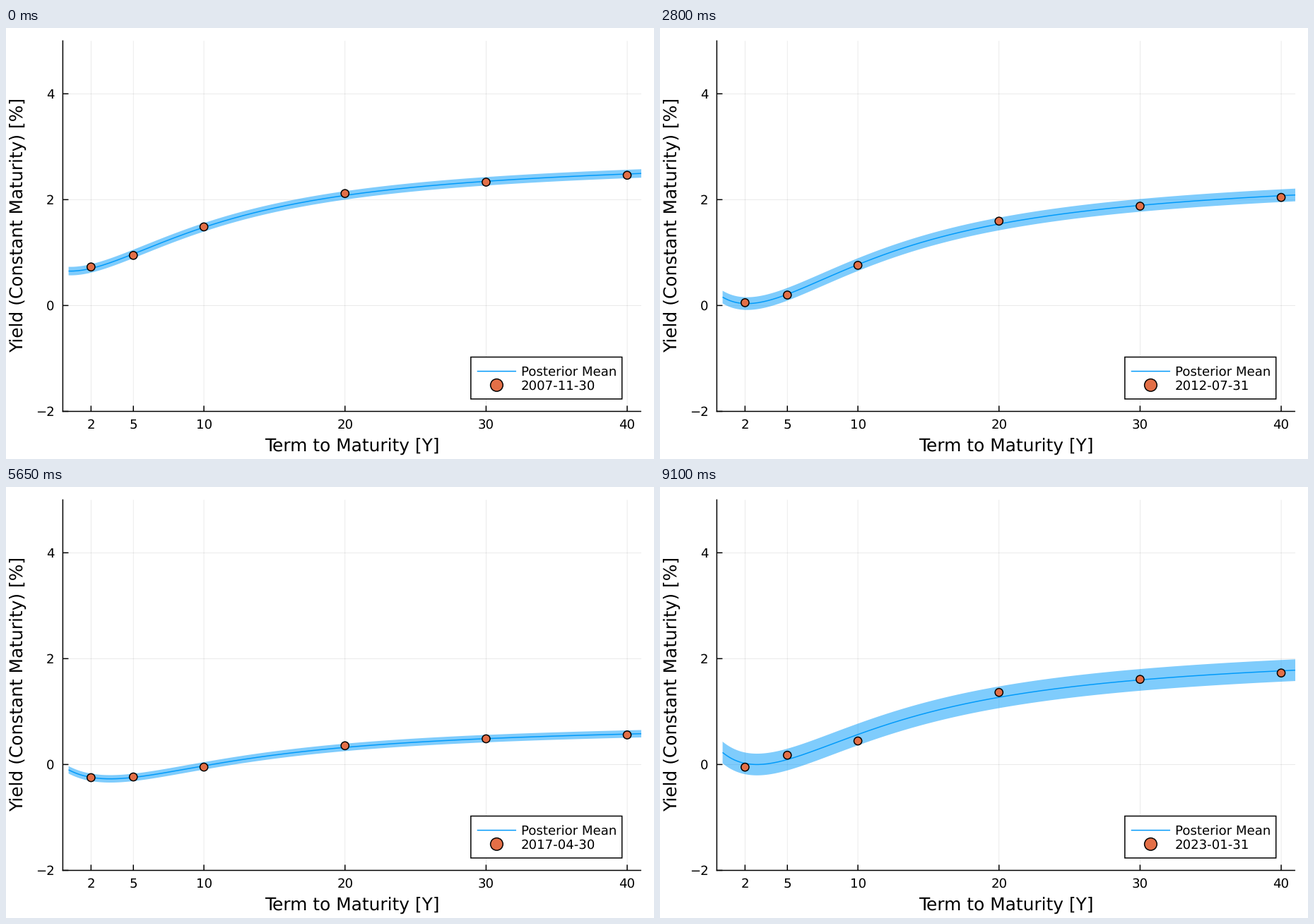
Write a matplotlib script that moves like this. It is 917 px wide and 611 px high and loops after 9150 ms.

```python
import numpy as np
import matplotlib.pyplot as plt
from matplotlib.animation import FuncAnimation
from matplotlib.patches import Circle, Polygon, Rectangle

W, H, DPI = 917, 611, 64
PT = 72 / DPI
FRAMES, INTERVAL = 183, 50
BLUE, ORANGE = "#009AFA", "#E36F47"
GRID = (0, 0, 0, .1)
TERMS = np.array([2, 5, 10, 20, 30, 40])
CURVE_T = np.linspace(.41, 41, 240)
DECAY = .285
LEFT, RIGHT, TOP, BOTTOM = 80.4, 899, 18.2, 543.5

# month, yield at 0, 20 and 40 years, half width of the band
KEYS = np.array([
    [0, .66, 2.08, 2.485, .08],
    [13, .30, 1.72, 2.00, .24],
    [26, -.20, 1.965, 2.41, .333],
    [39, .05, 1.93, 2.33, .27],
    [56, .235, 1.54, 2.075, .12],
    [77, .20, 1.44, 1.87, .20],
    [100, .10, .39, .685, .09],
    [104, -.15, .16, .36, .09],
    [129, .17, .62, .965, .035],
    [141, -.15, .03, .18, .06],
    [155, .11, .425, .685, .03],
    [171, .15, .62, .92, .08],
    [182, .33, 1.27, 1.77, .205],
])

# offsets of the dots from the curve in band widths, first and last month
OFF_START = np.array([.35, -.35, .1, .45, -.2, -.3])
OFF_END = np.array([-.35, .4, -.6, .45, .05, -.2])


def loadings(t):
    x = DECAY * np.asarray(t, float) + 1e-9
    slope = (1 - np.exp(-x)) / x
    return np.column_stack([np.ones_like(x), slope, slope - np.exp(-x)])


def build():
    months = np.arange(FRAMES)
    short, mid, far, width = [np.interp(months, KEYS[:, 0], col)
                              for col in KEYS[:, 1:].T]
    # monthly wobble that dies out at the key months
    near = np.abs(months[:, None] - KEYS[:, 0]).min(axis=1)
    wobble = np.random.default_rng(7).normal(0, .03, FRAMES) * np.minimum(near / 3, 1)
    anchors = np.array([short + wobble / 2, mid + wobble, far + wobble])
    params = np.linalg.solve(loadings([0, 20, 40]), anchors)
    means = (loadings(CURVE_T) @ params).T
    u = (months / (FRAMES - 1))[:, None]
    offsets = OFF_START * (1 - u) + OFF_END * u
    dots = (loadings(TERMS) @ params).T + width[:, None] * offsets
    return means, width, dots


def month_end(i):
    year, month = divmod(2007 * 12 + 10 + i, 12)
    following = np.datetime64(f"{year}-{month + 1:02d}", "M") + 1
    return str(following.astype("datetime64[D]") - 1)


def px(t):
    return LEFT + 19.966 * t


def py(v):
    return 393.4 - 75.03 * v


plt.rcParams.update({"font.family": "DejaVu Sans", "text.hinting": "none"})
fig = plt.figure(figsize=(W / DPI, H / DPI), dpi=DPI, facecolor="white")
ax = fig.add_axes([0, 0, 1, 1])
ax.set_xlim(0, W)
ax.set_ylim(H, 0)
ax.axis("off")


def line(xs, ys, color="black", width=1.5, z=4):
    return ax.plot(xs, ys, color=color, lw=width * PT, zorder=z,
                   solid_capstyle="butt", snap=False)[0]


def text(x, y, s, size=18.1, **kw):
    style = {"ha": "left", "va": "baseline", **kw}
    return ax.text(x, y, s, fontsize=size * PT, zorder=8, **style)


def circle(x, y, radius, z):
    return ax.add_patch(Circle((x, y), radius, fc=ORANGE, ec="black",
                               lw=1.5 * PT, zorder=z))


for t in TERMS:
    x = px(t)
    line([x, x], [TOP, BOTTOM], GRID, .8, 1)
    line([x, x], [BOTTOM, BOTTOM - 8])
    text(x, 567.7, str(t), ha="center")
for v in (-2, 0, 2, 4):
    y = py(v)
    if v > -2:
        line([LEFT, RIGHT], [y, y], GRID, .8, 1)
    line([LEFT, LEFT + 8], [y, y])
    text(68.4, y + 6.7, str(v).replace("-", "\u2212"), ha="right")
line([LEFT, LEFT], [TOP - .7, BOTTOM + .7])
line([LEFT - .7, RIGHT], [BOTTOM, BOTTOM])
text(490, 599.3, "Term to Maturity [Y]", 24.85, ha="center")
text(17.3, 279, "Yield (Constant Maturity) [%]", 24.85, ha="center",
     va="center", rotation=90)

ax.add_patch(Rectangle((657.8, 466.5), 213.9, 59.4, fc="white", ec="black",
                       lw=1.5 * PT, zorder=6, snap=False))
line([666.7, 722], [486.6, 486.6], BLUE, z=7)
circle(694.4, 506.3, 8.8, 7)
text(728.7, 493.2, "Posterior Mean")
date = text(728.7, 513, "")

band = ax.add_patch(Polygon([[0, 0], [1, 1], [1, 0]], fc=BLUE, ec="none",
                            alpha=.5, zorder=2))
mean = line([], [], BLUE, z=3)
points = [circle(px(t), 0, 5.6, 5) for t in TERMS]
means, width, dots = build()


def draw(i):
    x, m, w = px(CURVE_T), means[i], width[i]
    band.set_xy(np.column_stack([np.r_[x, x[::-1]],
                                 py(np.r_[m + w, (m - w)[::-1]])]))
    mean.set_data(x, py(m))
    for point, t, v in zip(points, TERMS, dots[i]):
        point.center = px(t), py(v)
    date.set_text(month_end(i))
    return [band, mean, date, *points]


anim = FuncAnimation(fig, draw, frames=FRAMES, interval=INTERVAL,
                     repeat=True, repeat_delay=0, blit=False)
plt.show()
```
